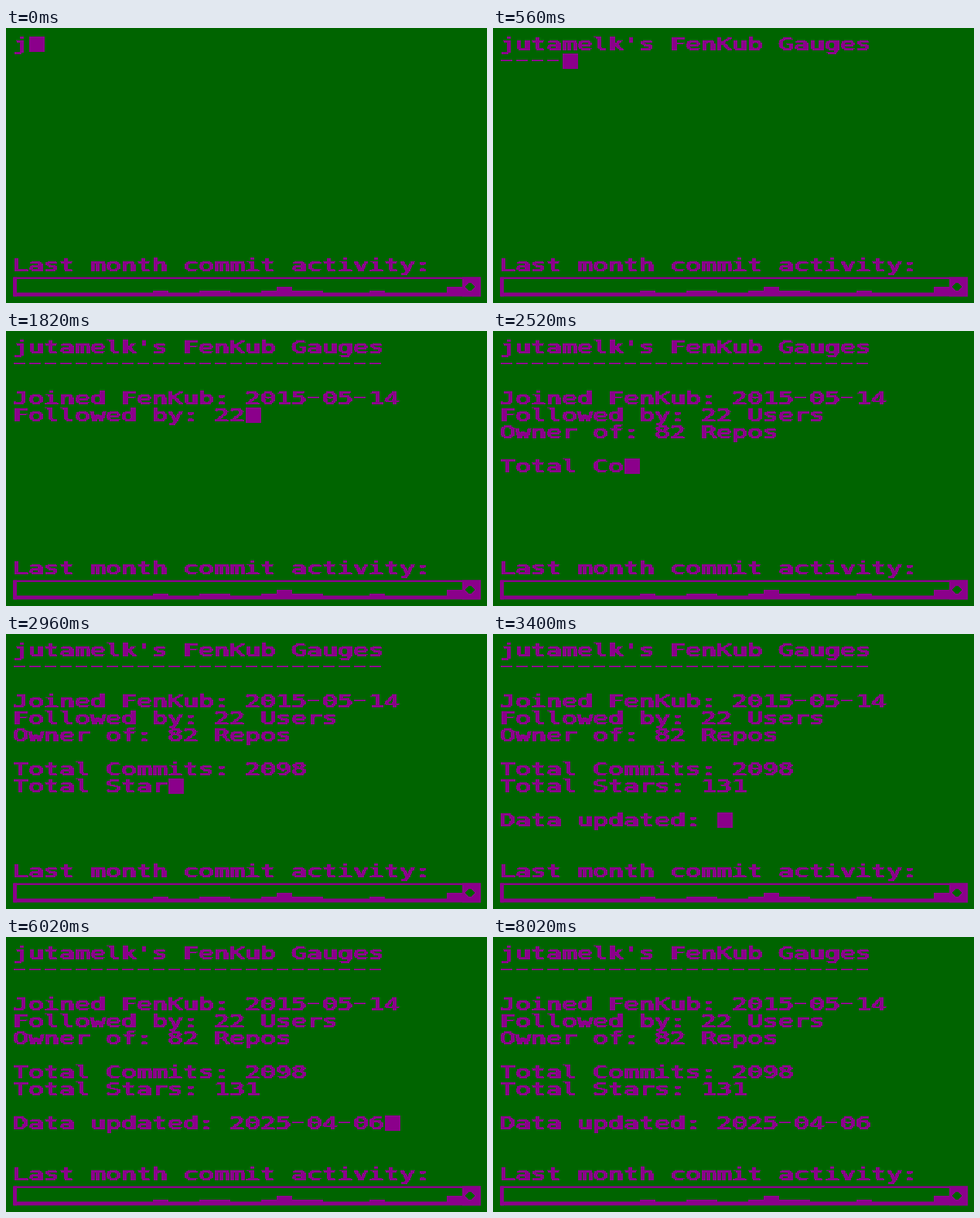
An HTML page with a canvas for the animation above (8.42 s loop, 622 px wide and 356 px high).

```html
<!DOCTYPE html>
<html lang="en">
<head>
<meta charset="utf-8">
<title>Terminal stats</title>
<style>
  html, body { margin: 0; width: 100%; height: 100%; overflow: hidden; background: #006400; }
  canvas { display: block; }
</style>
</head>
<body>
<canvas id="screen" width="622" height="356"></canvas>
<script>
const LOOP = 8420, STEP = 20, BLINK = 400;
const INK = '#8b008b', PAPER = '#006400';
const LEFT = 10, TOP = 11, CELL_W = 20, CELL_H = 22;   // character cell on the stage
const DOT = 1.25, DOTS_W = 16, DOTS_H = 20;            // glyph size in font dots

const lines = [
  "jutamelk's FenKub Gauges",
  '-'.repeat(24),
  '',
  'Joined FenKub: 2015-05-14',
  'Followed by: 22 Users',
  'Owner of: 82 Repos',
  '',
  'Total Commits: 2098',
  'Total Stars: 131',
  '',
  'Data updated: 2025-04-06'
];
const footer = 'Last month commit activity:', FOOTER_ROW = 13;
const total = lines.join('\n').length;
const typedAt = (total - 1) * STEP;

// column, row, start and end of each glitched cell
const glitches = [[20, 1, 1060, 1160], [15, 3, 3500, 4420]];

// activity per day in eighths of a cell
const activity = '111111111211221124221112111144841400';

const ctx = document.getElementById('screen').getContext('2d');
ctx.imageSmoothingEnabled = false;

// Renders all the text once as coarse, hard-edged dots.
function makeSheet() {
  const sheet = document.createElement('canvas');
  sheet.width = 31 * DOTS_W;
  sheet.height = 14 * DOTS_H;
  const g = sheet.getContext('2d', { willReadFrequently: true });
  g.font = '18.5px "DejaVu Sans Mono", monospace';
  g.fillStyle = INK;

  const write = (text, row) => [...text].forEach((ch, col) => {
    g.setTransform(1, 0, 0, 1, col * DOTS_W, row * DOTS_H);
    if (ch === '-') return g.fillRect(0, 6, 12, 2);
    g.transform(1.43, 0, 0, 1, 0, 14);
    for (const dx of [-1.2, -0.6, 0]) g.fillText(ch, dx, 0);   // heavy upright strokes
  });
  lines.forEach(write);
  write(footer, FOOTER_ROW);

  const image = g.getImageData(0, 0, sheet.width, sheet.height);
  const d = image.data;
  for (let i = 0; i < d.length; i += 4) {
    const on = d[i + 3] > 105;
    d[i] = d[i + 2] = 139;
    d[i + 1] = 0;
    d[i + 3] = on ? 255 : 0;
  }
  g.putImageData(image, 0, 0);
  return sheet;
}
const sheet = makeSheet();

function box(color, x, y, w, h) {
  ctx.fillStyle = color;
  ctx.fillRect(x, y, w, h);
}

const cellX = col => LEFT + col * CELL_W;
const cellY = row => TOP + row * CELL_H;
const block = (col, row) => box(INK, cellX(col), cellY(row), CELL_W, 20);

function showRow(row, count) {
  if (!count) return;
  ctx.drawImage(sheet, 0, row * DOTS_H, count * DOTS_W, DOTS_H,
    LEFT, cellY(row), count * CELL_W, DOTS_H * DOT);
}

function face(col, row) {
  const x = cellX(col), y = cellY(row);
  block(col, row);
  for (const dx of [0, 18]) for (const dy of [0, 18]) box(PAPER, x + dx, y + dy, 2, 2);
  box(PAPER, x + 5, y + 4, 3, 4);
  box(PAPER, x + 12, y + 4, 3, 4);
  box(PAPER, x + 5, y + 11, 10, 2);
  box(PAPER, x + 7, y + 13, 6, 2);
}

function chart() {
  box(INK, 10, 322.5, 604, 2.5);
  box(INK, 9, 322.5, 5, 25);
  box(INK, 10, 345, 604, 2.5);
  for (let col = 0; col < 29; col++) {
    const h = activity[col] * 2.5;
    box(INK, cellX(col), 345 - h, CELL_W, h);
  }
  box(INK, 590, 322.5, 24, 25);
  for (let i = 0; i < 5; i++) box(PAPER, 594 + i, 334 - i, 12 - 2 * i, 2 + 2 * i);
}

function draw(t) {
  box(PAPER, 0, 0, 622, 356);
  showRow(FOOTER_ROW, footer.length);
  chart();

  let left = Math.min(total, Math.floor(t / STEP) + 1), row = 0;
  while (left > lines[row].length) {
    showRow(row, lines[row].length);
    left -= lines[row++].length + 1;
  }
  showRow(row, left);

  const idle = t - typedAt - STEP;
  if (idle < 0 || Math.floor(idle / BLINK) % 2 === 0) block(left, row);

  for (const [col, r, from, to] of glitches) if (t >= from && t < to) face(col, r);
}

const start = performance.now();
function frame(now) {
  draw(Math.max(0, now - start) % LOOP);
  requestAnimationFrame(frame);
}
draw(0);
requestAnimationFrame(frame);
</script>
</body>
</html>
```
